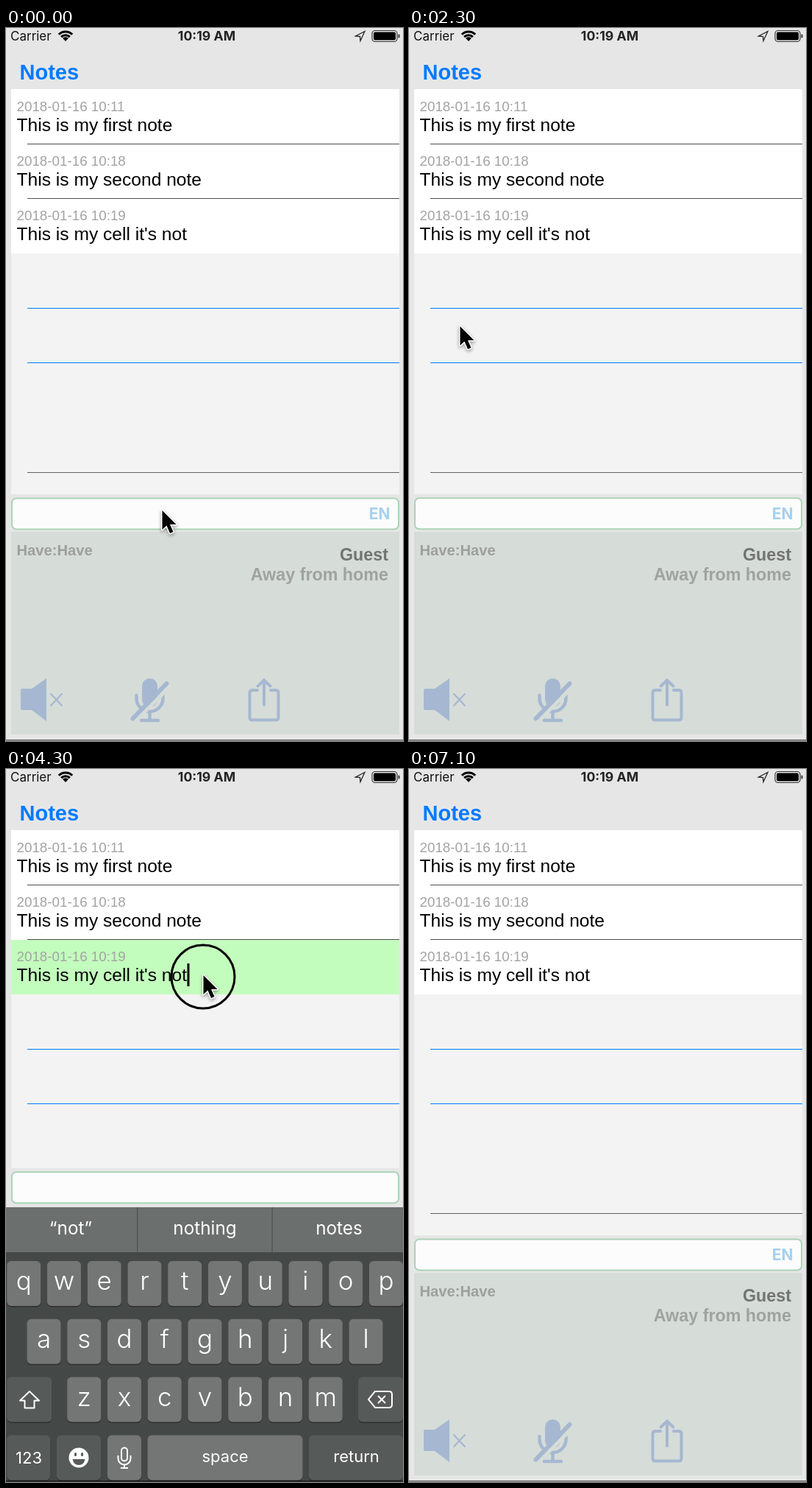
Animation, 540 px wide and 968 px high, one loop 8000 ms. Source, as an HTML page with a canvas:

```html
<!DOCTYPE html>
<html lang="en">
<head>
<meta charset="utf-8">
<title>Notes</title>
<style>
  html, body { margin: 0; width: 100%; height: 100%; overflow: hidden; background: #e6e6e6; }
  canvas { display: block; }
</style>
</head>
<body>
<canvas id="stage" width="540" height="968"></canvas>
<script>
const g = document.getElementById('stage').getContext('2d');
const LOOP = 8000, STEP = 100, W = 540, H = 968;
const ARIAL = '"Liberation Sans", Arial, sans-serif';
const INTER = 'Inter, Roboto, sans-serif';

const LIGHT = { bar: '#afb5c0', divider: '#c6cbd2', word: '#fff', body: '#cbd0d6', key: '#fff',
  side: '#9fa9b4', shadow: '#878b90', ink: '#000', dim: '#747d87', weight: 400 };
const DARK = { bar: '#6b6f6d', divider: '#4f5251', word: '#fff', body: '#444846', key: '#737675',
  side: '#565a58', shadow: '#2e3130', ink: '#fff', dim: '#fff', weight: 300 };

// time, x, y of the pointer tip
const POINTER = [[0, 212, 654], [1200, 212, 654], [1700, 242, 405], [1850, 242, 405],
  [2300, 69, 404], [2600, 69, 404], [3200, 268, 279], [4800, 268, 279],
  [5600, 170, 347], [LOOP, 170, 347]];
const PRESSES = [[100, 300], [1700, 1900], [3400, 4600], [5700, 6100]];
const POINTER_GONE = 6600;
const EDIT_START = 3922, EDIT_END = 5815;

const clamp = v => Math.max(0, Math.min(1, v));
const between = (t, a, b) => t >= a && t < b;

// critically damped spring from 0 to 1
function spring(ms) {
  const x = Math.max(0, ms) * 0.01826;
  return 1 - (1 + x) * Math.exp(-x);
}
const keyboardAt = t =>
  spring(t - 267) - spring(t - 1840) + spring(t - EDIT_START) - spring(t - EDIT_END);

function pointerAt(t) {
  const i = POINTER.findIndex(p => p[0] > t);
  const [t0, x0, y0] = POINTER[i - 1], [t1, x1, y1] = POINTER[i];
  const u = (t - t0) / (t1 - t0), e = u * u * (3 - 2 * u);
  return [x0 + (x1 - x0) * e, y0 + (y1 - y0) * e];
}

function rect(x, y, w, h, color) {
  g.fillStyle = color;
  g.fillRect(x, y, w, h);
}
function round(x, y, w, h, r, fill, stroke, width = 2) {
  g.beginPath();
  g.roundRect(x, y, w, h, r);
  if (fill) { g.fillStyle = fill; g.fill(); }
  if (stroke) { g.strokeStyle = stroke; g.lineWidth = width; g.stroke(); }
}
function text(str, x, y, font, color, align = 'left') {
  g.font = font;
  g.fillStyle = color;
  g.textAlign = align;
  g.fillText(str, x, y);
}
function line(d, color, width) {
  g.strokeStyle = color;
  g.lineWidth = width;
  g.stroke(new Path2D(d));
}
function fill(d, color) {
  g.fillStyle = color;
  g.fill(new Path2D(d));
}

function statusBar() {
  text('Carrier', 6, 17, '400 17px ' + INTER, '#111');
  text('10:19 AM', 273, 17, '700 17.7px ' + INTER, '#222', 'center');
  const spread = Math.PI / 4;
  g.strokeStyle = '#000';
  g.lineWidth = 3;
  g.lineCap = 'butt';
  for (const r of [13, 8.3]) {
    g.beginPath();
    g.arc(81, 18, r, -Math.PI / 2 - spread, -Math.PI / 2 + spread);
    g.stroke();
  }
  fill('M81 18 L77 13.8 A5.8 5.8 0 0 1 85 13.8Z', '#000');
  line('M488 4.5 L475.5 11 L481.5 11.5 L482 17.5Z', '#222', 1.3);
  round(498, 3.5, 34, 15, 4, null, '#333', 1.2);
  round(500, 5.5, 30, 11, 2, '#000');
  round(533.5, 8.5, 2, 5, 1, '#333');
}

function noteList(t, bottom) {
  rect(7, 83, 528, bottom - 83, '#f3f3f3');
  rect(7, 83, 528, 223, '#fff');
  const editing = between(t, EDIT_START, EDIT_END);
  if (editing) rect(7, 232, 528, 74, '#c3fdbd');
  const notes = [['10:11', 'This is my first note'], ['10:18', 'This is my second note'],
    ['10:19', "This is my cell it's not"]];
  notes.forEach(([time, note], i) => {
    const y = 74.2 * i;
    text('2018-01-16 ' + time, 14.5, 112.5 + y, '18.8px ' + ARIAL, '#a3a3a3');
    text(note, 14.5, 139.5 + y, '24.6px ' + ARIAL, '#000');
  });
  if (editing && (t - 4000) % 900 < 600) rect(246.5, 264, 3, 31, '#000');
  const rules = [[157, '#4d4d52'], [231, '#4d4d52'], [380, '#007aff'], [454, '#007aff'], [603, '#606066']];
  for (const [y, color] of rules) if (y < bottom) rect(29, y, 506, 1, color);
}

function tray() {
  const icon = '#a6b8d1', back = '#d6dcd8';
  rect(7, 684, 528, 275, back);
  text('Have:Have', 14.5, 716, 'bold 20.2px ' + ARIAL, '#9d9f9e');
  text('Guest', 520, 722.5, 'bold 23.3px ' + ARIAL, '#727473', 'right');
  text('Away from home', 520, 750, 'bold 23.3px ' + ARIAL, '#9fa2a1', 'right');

  g.lineCap = 'butt';
  fill('M20 899 Q20 897 22 897 H35 L55 883 V941 L35 926 H22 Q20 926 20 924Z', icon);
  line('M60.5 903.5 L76.5 920.5 M76.5 903.5 L60.5 920.5', icon, 2.3);

  g.lineCap = 'round';
  round(185, 883, 21, 39, 10.5, icon);
  line('M177.5 906 V910 A18 18 0 0 0 213.5 910 V906 M195.5 928 V938 M184 940 H207', icon, 4.5);
  line('M176 941 L223 894', back, 5);
  line('M172.5 937.5 L218.5 890', icon, 6);
  line('M342 899 H335 Q331.5 899 331.5 902.5 V936 Q331.5 939.5 335 939.5 H367 ' +
    'Q370.5 939.5 370.5 936 V902.5 Q370.5 899 367 899 H360 M351 919 V886 M342.5 893.5 L351 885.5 L359.5 893.5', icon, 4);
  g.lineCap = 'butt';
}

function suggestions(words, alpha, color) {
  g.globalAlpha = alpha;
  words.forEach((word, i) => text(word, 88 + 182.5 * i, 37, '400 24.3px ' + INTER, color, 'center'));
  g.globalAlpha = 1;
}

function key(x, y, w, color, skin) {
  round(x, y + 1.6, w, 61, 6, skin.shadow);
  round(x, y, w, 61, 6, color);
}

function keyIcons(skin, dark) {
  const ink = skin.ink;
  g.lineJoin = 'round';
  line('M32 250 L45 262.5 H38.5 V272.5 H25.5 V262.5 H19Z', ink, 2);
  line('M502 250 H521 Q525 250 525 254 V268 Q525 272 521 272 H502 L493 261Z ' +
    'M506 256 L516 266 M516 256 L506 266', ink, 2);

  g.beginPath();
  g.arc(99, 340, 13.5, 0, 7);
  g.strokeStyle = g.fillStyle = ink;
  g.lineWidth = 2;
  dark ? g.fill() : g.stroke();
  const face = dark ? skin.side : ink;
  round(93, 333, 3, 5, 1.5, face);
  round(102, 333, 3, 5, 1.5, face);
  fill('M90.5 342 H107.5 Q106 350 99 350 Q92 350 90.5 342Z', face);
  if (!dark) fill('M92.8 343.5 H105.2 L104.5 345.5 H93.5Z', '#fff');

  round(157, 326.5, 8, 18, 4, null, ink, 2);
  line('M152.5 337 V341 A8.5 8.5 0 0 0 169.5 341 V337 M161 349.5 V354 M156 354 H166', ink, 2);
  g.lineJoin = 'miter';
}

function keyboard(t, top) {
  const dark = t > 3000, skin = dark ? DARK : LIGHT;
  g.save();
  g.translate(0, top);
  rect(0, 0, W, 61, skin.bar);
  rect(0, 61, W, H, skin.body);
  rect(178, 0, 1.2, 61, skin.divider);
  rect(361.5, 0, 1.2, 61, skin.divider);
  const swap = dark ? clamp((t - EDIT_START - 60) / 150) : 0;
  suggestions(['I', 'the', 'clear'], 1 - swap, skin.word);
  suggestions(['“not”', 'nothing', 'notes'], swap, skin.word);

  const rows = [['qwertyuiop', 1.2, 73], ['asdfghjkl', 28.5, 151.7], ['zxcvbnm', 83.2, 230.5]];
  for (const [letters, left, y] of rows) {
    [...letters].forEach((letter, i) => {
      const x = left + 54.75 * i;
      key(x, y, 46, skin.key, skin);
      text(letter, x + 23, y + 39.5, skin.weight + ' 35px ' + INTER, skin.ink, 'center');
    });
  }
  const sideKeys = [[1.2, 230.5, 61], [479, 230.5, 61], [1.2, 309.5, 59], [69, 309.5, 60], [412, 309.5, 128]];
  for (const [x, y, w] of sideKeys) key(x, y, w, skin.side, skin);
  key(138, 309.5, 46, skin.key, skin);
  key(192.5, 309.5, 211, skin.key, skin);
  const small = '400 22px ' + INTER;
  text('123', 31, 348, small, skin.ink, 'center');
  text('space', 298, 346.5, small, skin.ink, 'center');
  text('return', 476.5, 346.5, small, skin.dim, 'center');
  keyIcons(skin, dark);
  g.restore();
}

function pointer(t) {
  if (t >= POINTER_GONE) return;
  const [x, y] = pointerAt(t);
  g.save();
  g.translate(x, y);
  if (PRESSES.some(([a, b]) => between(t, a, b))) {
    g.beginPath();
    g.arc(0, 3, 43, 0, 7);
    g.strokeStyle = '#000';
    g.lineWidth = 3;
    g.stroke();
  }
  const arrow = new Path2D('M0.5 1 V27 L6.5 21.5 L11 32 L15.5 30 L11 20 H19.5Z');
  g.shadowColor = 'rgba(0,0,0,.4)';
  g.shadowBlur = 4;
  g.shadowOffsetY = 2;
  g.strokeStyle = '#fff';
  g.lineWidth = 3;
  g.lineJoin = 'round';
  g.stroke(arrow);
  g.shadowColor = 'transparent';
  g.fillStyle = '#000';
  g.fill(arrow);
  g.restore();
}

function draw(t) {
  const shown = keyboardAt(t), fieldTop = 638 - 92 * shown;
  rect(0, 0, W, H, '#e6e6e6');
  statusBar();
  text('Notes', 18.5, 69.5, 'bold 29px ' + ARIAL, '#007aff');
  noteList(t, fieldTop - 5);
  tray();
  round(8, fieldTop + 0.5, 526, 42, 6, '#fcfcfc', '#acd3b6', 2);
  text('EN', 522.5, 667, '700 21px ' + INTER, 'rgba(80,165,225,.5)', 'right');
  if (shown > 0.004) keyboard(t, H - 376 * shown);
  rect(0, 966, W, 1.5, 'rgba(0,0,0,.6)');
  pointer(t);
}

function frame() {
  const t = performance.now() % LOOP;
  draw(Math.floor(t / STEP) * STEP);
  requestAnimationFrame(frame);
}
frame();
</script>
</body>
</html>
```
